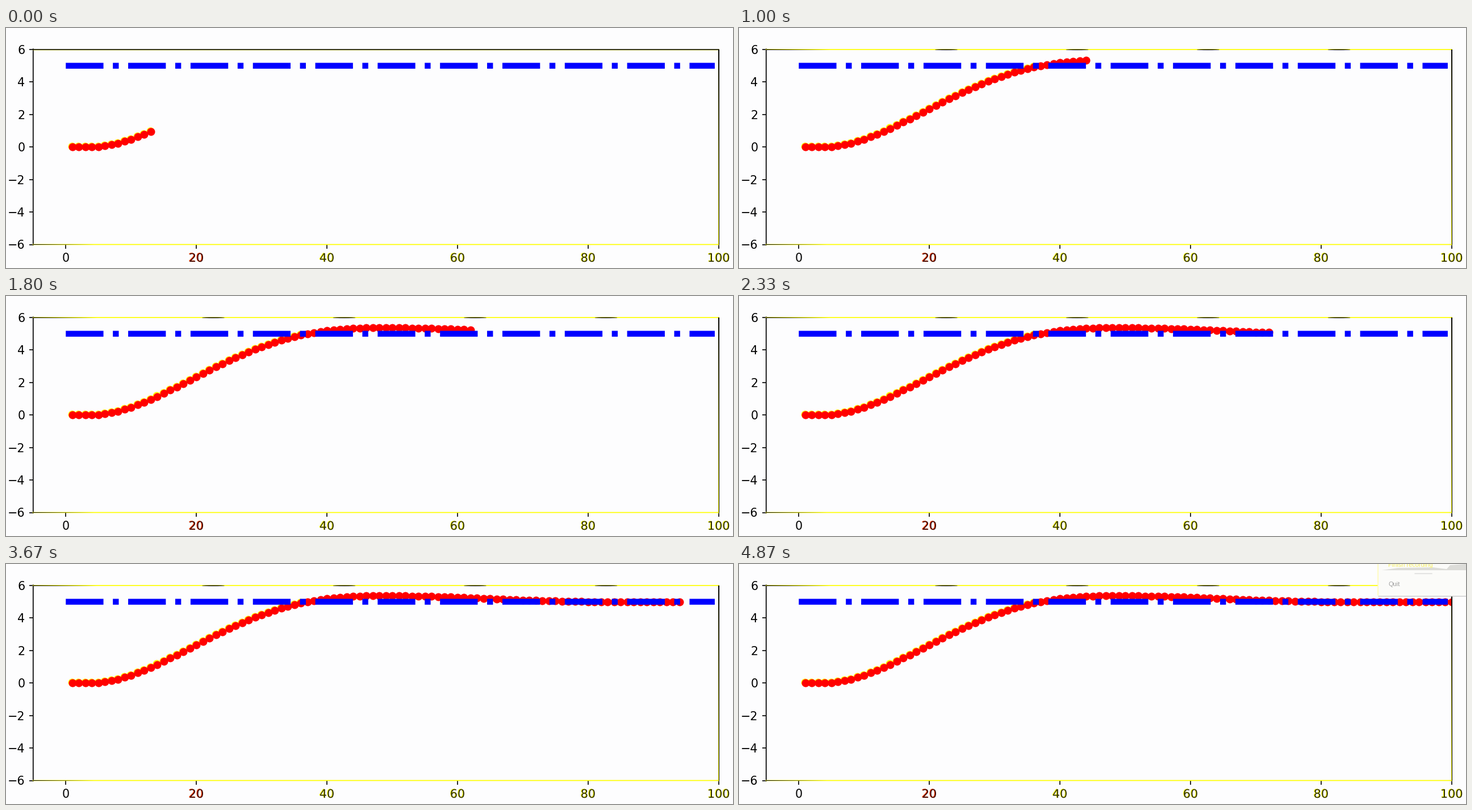
A matplotlib script that plays this animation: 1280x424 px, repeating every 4.94 s.

```python
import numpy as np
import matplotlib.pyplot as plt
from matplotlib import patheffects as pe
from matplotlib.animation import FuncAnimation
from matplotlib.patches import Ellipse, Polygon, Rectangle

W, H, DPI = 1280, 424, 100
PX = 72 / DPI              # points per pixel
UNIT = 2.072 * PX          # scale of the default plot style
LOOP, TICK = 4940, 20
STEP, LAST = 200 / 3, 73   # picture updates 15 times a second
PAPER, YELLOW = "#fdfdfe", "#ffff00"
L, R, T, B = 47.8, 1254.8, 38.0, 382.5
GOAL, PEAK = 5, 5.37


def response(x):
    """Late start, skewed rise to the peak, then a smooth return to the goal."""
    s = np.clip((x - 3.9) / 46, 0, 1)
    r = np.clip((x - 49) / 33, 0, 1)
    rise = s * s * (6 - 8 * s + 3 * s * s)
    return PEAK * rise - (PEAK - GOAL) * r * r * (3 - 2 * r)


def count(t):
    """Dots drawn after t seconds; each new dot takes a little longer."""
    a, b = 0.01712, 0.000261
    return int((-a + np.sqrt(a * a + 4 * b * (t + 0.28))) / (2 * b))


xs = np.arange(1, 101)
ys = response(xs)

fig = plt.figure(figsize=(W / DPI, H / DPI), dpi=DPI, facecolor=PAPER)
ax = fig.add_axes([L / W, 1 - B / H, (R - L) / W, (B - T) / H], facecolor=PAPER)
ax.set_xlim(-5, 100)
ax.set_ylim(-6, 6)
ax.set_xticks(range(0, 101, 20))
ax.set_yticks(range(-6, 7, 2))
ax.tick_params(length=3.5 * UNIT, width=0.8 * UNIT, pad=3.5 * UNIT,
               labelsize=10 * UNIT, labelfontfamily="DejaVu Sans")
ax.spines[:].set_visible(False)

for k, tick in enumerate(ax.xaxis.get_major_ticks()[1:]):
    dark, tint = ("#400800", "#ff4000") if k == 0 else ("#303000", YELLOW)
    tick.tick1line.set_color("#d02000" if k == 0 else "#6b6b00")
    tick.label1.set_color(dark)
    tick.label1.set_path_effects([
        pe.withSimplePatchShadow(offset=(-0.8, 0.4), alpha=1,
                                 shadow_rgbFace=tint)])

dot = dict(ls="", marker="o", ms=6 * UNIT, mew=0.75 * UNIT)
glow, = ax.plot([], [], color=YELLOW, zorder=2, **dot)
dots, = ax.plot([], [], color="#ff0000", zorder=3, **dot)
ax.plot([0, 99.4], [GOAL, GOAL], "-.", color="#0000ff", lw=5 * UNIT, zorder=4,
        snap=False)

# Pixel-space layer for the frame and the menu
top = fig.add_axes([0, 0, 1, 1], zorder=5)
top.set_xlim(0, W)
top.set_ylim(H, 0)
top.axis("off")


def rule(x, y, color, width=1.7, **kw):
    return top.plot(x, y, color=color, lw=width * PX, snap=False, **kw)[0]


def fill(patch, color="black", z=3):
    patch.set(facecolor=color, linewidth=0, zorder=z)
    return top.add_patch(patch)


rule([L, L], [T - 0.8, B + 0.8], "black")
rule([L, R], [B, B], YELLOW)
rule([R, R], [T, B], YELLOW)
fill(Polygon([(L, B - 0.9), (L, B + 0.9), (155, B + 0.9)]))
fill(Polygon([(R - 0.6, T), (R + 0.9, T), (R + 0.9, B), (R + 0.3, B)]))

black_top = [rule([L, R], [T + 0.6, T + 0.6], "#c8c800", 1.4),
             rule([L, R], [T, T], "black", 1.5)]
yellow_top = [rule([L, R], [T, T], YELLOW),
              fill(Polygon([(L, T - 0.4), (L, T + 0.9), (160, T + 0.8)]))]
yellow_top += [fill(Ellipse((x, T + 0.4), 40, 1.5))
               for x in np.arange(365, R, 230.5)]

small = dict(family="Liberation Sans", fontsize=11 * PX, va="baseline", zorder=8)
menu = [
    fill(Rectangle((1125, -6), 170, 63), "#fbfbf9", 6),
    fill(Polygon([(1132, 11), (1160, 7), (1222, 6), (1246, 9), (1252, 2),
                  (1280, 0), (1280, 11)]), "#dcdcd8", 7),
    rule([1125, 1125], [0, 55], "#fffbb0", 1.5, zorder=7),
    rule([1126, 1280], [57, 57], "#c4c4c4", 1.2, zorder=7),
    rule([1190, 1220], [17, 17], "#d4d4d4", 1.2, zorder=7),
    top.text(1143, 5, "Finish recording", color="#f5ee60", **small),
    top.text(1143, 39, "Quit", color="#a0a0a0", **small),
]


def show(artists, on):
    for artist in artists:
        artist.set_visible(on)


def draw(i):
    step = min(int((i * TICK + 14) / STEP), LAST)
    n = count(step * STEP / 1000)
    dots.set_data(xs[:n], ys[:n])
    # The glow shows on the climb only
    m = min(n, 36)
    glow.set_data(xs[:m] - 0.07, ys[:m] + 0.04)
    show(black_top, step == 0)
    show(yellow_top, step > 0)
    show(menu, step >= 69)
    return dots, glow


anim = FuncAnimation(fig, draw, frames=LOOP // TICK, interval=TICK,
                     repeat=True, repeat_delay=0, cache_frame_data=False)
plt.show()
```
